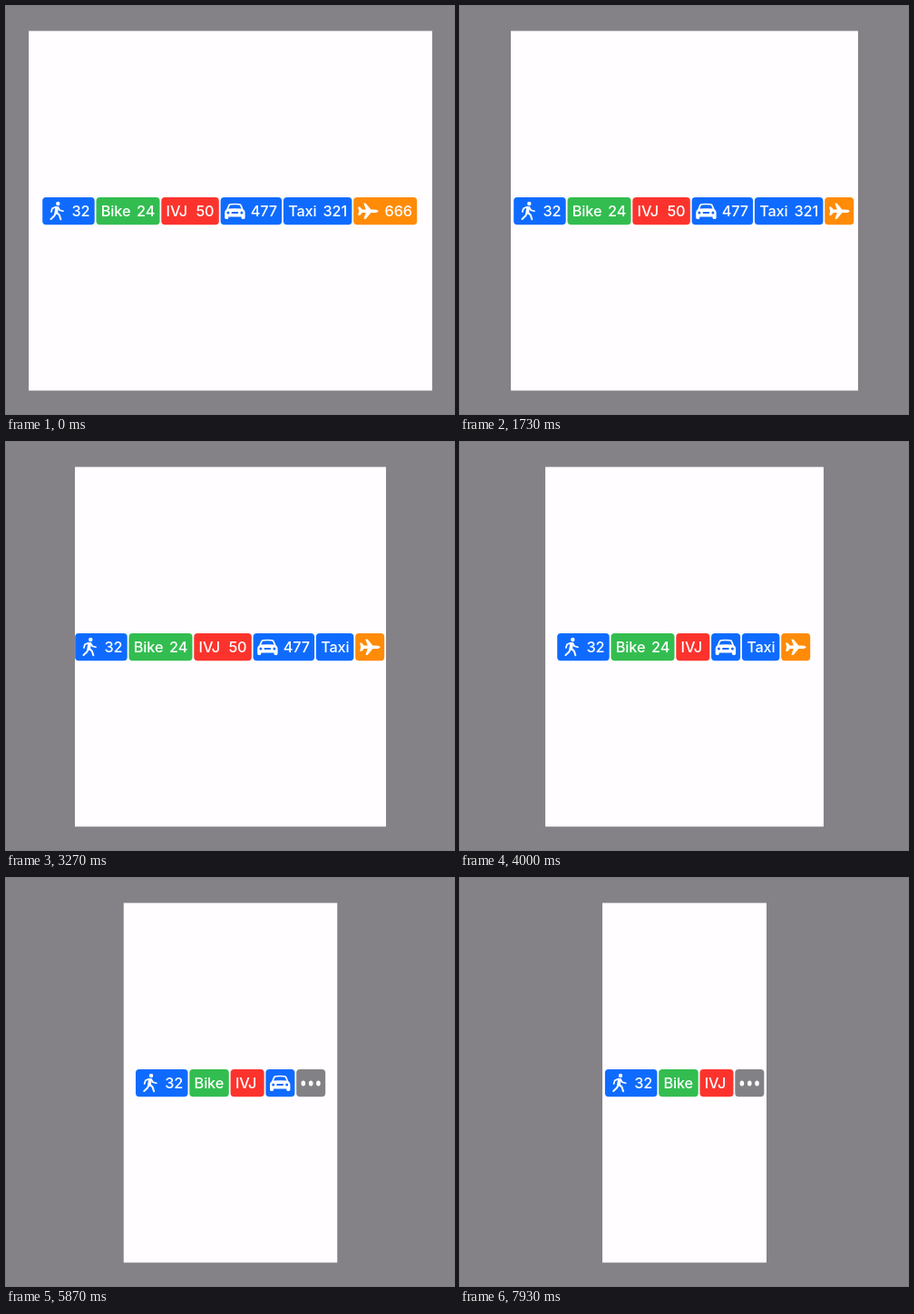
An HTML page for the animation above (8 s loop, 494 by 450 pixels).

```html
<!DOCTYPE html>
<html lang="en">
<head>
<meta charset="utf-8">
<title>Adaptive route chips</title>
<style>
  html, body { margin: 0; width: 100%; height: 100%; overflow: hidden; background: #848287; }
  svg { display: block; width: 494px; height: 450px; }
  text { font: 500 16.3px Inter, "Liberation Sans", sans-serif; fill: #fff; letter-spacing: -.15px; }
  .line { fill: none; stroke: #fff; stroke-linecap: round; stroke-linejoin: round; }
</style>
</head>
<body>
<svg viewBox="0 0 494 450">
  <defs>
    <g id="walk" fill="#fff">
      <circle cx="17.1" cy="7" r="2.2"/>
      <g class="line">
        <path stroke-width="3.7" d="M15.9 11.8L15 17"/>
        <path stroke-width="1.7" d="M17 10.8L19 14.2L22.8 15.2M14.8 10.6L10.8 12.2L9.7 16"/>
        <path stroke-width="2" d="M14.5 17.5L13 20.6L9.3 24M16 17L18.7 19.8L20.1 24.2"/>
      </g>
    </g>
    <path id="car" fill="#fff" fill-rule="evenodd" d="M6.6 13.2L8.4 8.8Q9 7.2 10.8 7Q15.8 6.5 20.8 7Q22.6 7.2 23.2 8.8L25 13.2Q27 14.5 27 17V22.6Q27 24 25.6 24H24.2Q22.9 24 22.9 22.6V21.4H8.7V22.6Q8.7 24 7.4 24H6Q4.6 24 4.6 22.6V17Q4.6 14.5 6.6 13.2Z
      M8.6 12.6L10 9.4Q10.4 8.6 11.2 8.5Q15.8 8 20.4 8.5Q21.2 8.6 21.6 9.4L23 12.6Q15.8 12 8.6 12.6Z
      M6.8 16.9a1.5 1.5 0 1 0 3 0a1.5 1.5 0 1 0-3 0Z
      M21.8 16.9a1.5 1.5 0 1 0 3 0a1.5 1.5 0 1 0-3 0Z
      M13 15.9H18.6a1.1 1.1 0 0 1 0 2.2H13a1.1 1.1 0 0 1 0-2.2Z"/>
    <path id="plane" fill="#fff" d="M27.4 15.2Q27 17 23 17H19.2L13.8 23.5Q13.4 24 12.8 24H11.7Q11.1 24 11.3 23.4L13.6 17H9.6L7.5 19.4Q7.2 19.8 6.7 19.8H5.4Q4.8 19.8 5 19.2L6 15.2L5 11.2Q4.8 10.6 5.4 10.6H6.7Q7.2 10.6 7.5 11L9.6 13.4H13.6L11.3 7Q11.1 6.4 11.7 6.4H12.8Q13.4 6.4 13.8 6.9L19.2 13.4H23Q27 13.4 27.4 15.2Z"/>
    <g id="dots" fill="#fff">
      <ellipse cx="7.6" cy="15.5" rx="2.3" ry="2.9"/>
      <ellipse cx="16" cy="15.5" rx="2.3" ry="2.9"/>
      <ellipse cx="24.2" cy="15.5" rx="2.3" ry="2.9"/>
    </g>
  </defs>
  <rect id="panel" y="27.5" height="396.7" fill="#fffdff"/>
  <g id="row"></g>
</svg>
<script>
const LOOP = 8000, FPS = 15, GAP = 1.8, PAD = 5.3, MID = 247.6;
const BLUE = '#0f6bff';
const $ = id => document.getElementById(id);

function add(parent, tag, attrs, text = '') {
  const el = document.createElementNS('http://www.w3.org/2000/svg', tag);
  for (const key in attrs) el.setAttribute(key, attrs[key]);
  el.textContent = text;
  return parent.appendChild(el);
}

function makeChip(color, label, num, full, small) {
  const g = add($('row'), 'g', {});
  const box = add(g, 'rect', { height: 30.2, rx: 4, fill: color });
  if (label[0] === '#') add(g, 'use', { href: label });
  else add(g, 'text', { x: PAD, y: 21 }, label);
  const number = add(g, 'text', { x: full - PAD, y: 21, 'text-anchor': 'end' }, num);
  return { g, box, number, full, small };
}

const chips = [
  [BLUE, '#walk', '32', 57.5, 57.5],
  ['#33bd50', 'Bike', '24', 70, 43.5],
  ['#fc332d', 'IVJ', '50', 63.5, 37],
  [BLUE, '#car', '477', 67.5, 32],
  [BLUE, 'Taxi', '321', 75.5, 41.5],
  ['#ff8b07', '#plane', '666', 70, 32]
].map(args => makeChip(...args));
const more = makeChip('#828186', '#dots', '', 32, 32);

// Candidate layouts, widest first: numbers drop from the end, then whole chips.
const layouts = [];
function addLayout(items) {
  const width = items.reduce((sum, item) => sum + item.w + GAP, -GAP);
  const tail = items.at(-1).chip === more ? 0 : GAP;
  layouts.push({ items, width: width + tail });
}
for (let open = 6; open > 0; open--)
  addLayout(chips.map((chip, i) => ({ chip, w: i < open ? chip.full : chip.small })));
for (let keep = 5; keep > 0; keep--)
  addLayout([...chips.slice(0, keep), more].map(chip => ({ chip, w: chip.small })));

// Left edge of the panel over time: [ms, x]
const path = [[0, 25], [60, 25], [870, 39.5], [1730, 56], [2400, 69.6], [2600, 69.6],
  [3270, 76], [3470, 80.5], [4330, 102.5], [4800, 110.3], [5200, 117.5], [5870, 129.8],
  [6070, 134], [6730, 142.8], [7133, 142.8], [7930, 157], [8000, 157]];

function leftAt(t) {
  const i = path.findIndex(p => p[0] > t);
  const [t0, x0] = path[i - 1], [t1, x1] = path[i];
  return x0 + (x1 - x0) * (t - t0) / (t1 - t0);
}

function draw(now) {
  const frame = Math.floor((now % LOOP + 4) * FPS / 1000) % (LOOP * FPS / 1000);
  const left = leftAt(frame * 1000 / FPS), room = 495 - 2 * left;
  $('panel').setAttribute('x', left);
  $('panel').setAttribute('width', room);

  const { items, width } = layouts.find(l => l.width <= room);
  for (const chip of [...chips, more]) chip.g.style.display = 'none';
  let x = MID - width / 2;
  for (const { chip, w } of items) {
    chip.g.style.display = '';
    chip.g.setAttribute('transform', `translate(${x} 211)`);
    chip.box.setAttribute('width', w);
    chip.number.style.display = w === chip.full ? '' : 'none';
    x += w + GAP;
  }
}

let start;
function tick(now) {
  start ??= now;
  draw(now - start);
  requestAnimationFrame(tick);
}
draw(0);
requestAnimationFrame(tick);
</script>
</body>
</html>
```
